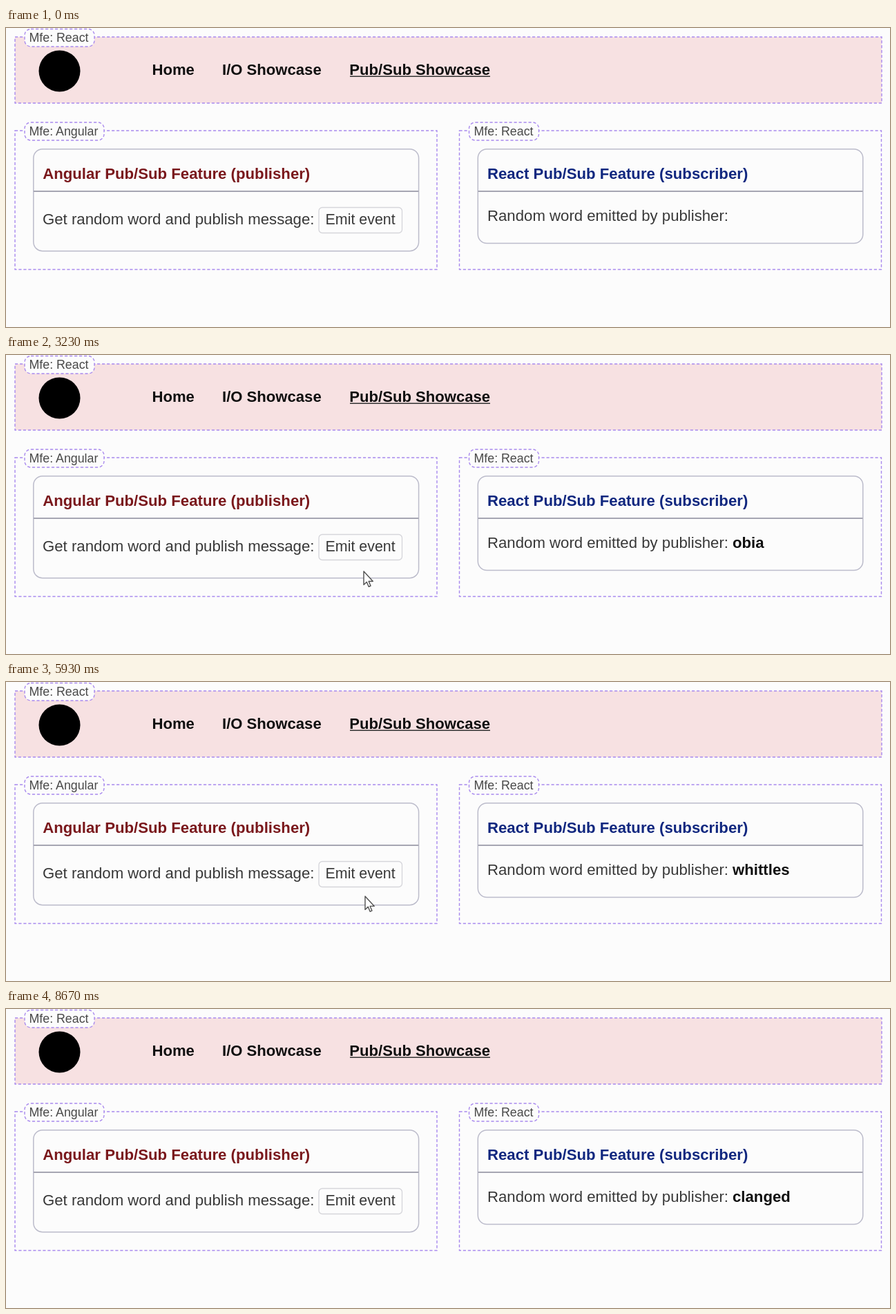
An HTML page for the animation above (8860 ms loop, 1280 by 434 pixels).

```html
<!DOCTYPE html>
<html lang="en">
<head>
<meta charset="utf-8">
<title>Pub/Sub Showcase</title>
<style>
  html, body { margin: 0; width: 100%; height: 100%; overflow: hidden; background: #fcfcfc; }
  svg { display: block; width: 1280px; height: 434px; }
  text { font: 22.2px "Liberation Sans", Arial, sans-serif; fill: #383838; white-space: pre; }
  .label { font-size: 17.8px; fill: #484848; }
  .nav { font-size: 22.1px; }
  .nav, .title, .word { font-weight: bold; fill: #101010; }
  .dash { fill: #fcfcfc; stroke: #a98aee; stroke-width: 1.4; stroke-dasharray: 4.2 2.8; }
  .bar { fill: #f7e1e2; }
  .card { fill: #fcfcfc; stroke: #bcbccb; stroke-width: 1.5; }
  .rule { stroke: #a6a6b2; stroke-width: 2; }
  .button { fill: #fcfcfc; stroke: #d5d5da; stroke-width: 1.3; }
  .button.hover { fill: #e3e3e3; }
  #cursor path { fill: #fff; stroke: #505050; stroke-width: 1.4; stroke-linejoin: round; }
</style>
</head>
<body>
<svg viewBox="0 0 1280 434">
  <rect class="dash bar" x="13" y="13" width="1255" height="96"/>
  <rect class="dash" x="13" y="149" width="611" height="201.5"/>
  <rect class="dash" x="656.5" y="149" width="611" height="201.5"/>

  <rect class="dash" x="27" y="1.5" width="101" height="25.5" rx="9"/>
  <rect class="dash" x="27" y="137" width="115" height="26" rx="9"/>
  <rect class="dash" x="670.5" y="137" width="101" height="26" rx="9"/>
  <text class="label" x="33.5" y="20">Mfe: React</text>
  <text class="label" x="33.5" y="156">Mfe: Angular</text>
  <text class="label" x="677.5" y="156">Mfe: React</text>

  <circle cx="77.5" cy="62.5" r="30"/>
  <text class="nav" x="211.5" y="68">Home</text>
  <text class="nav" x="313" y="68">I/O Showcase</text>
  <text class="nav" x="497.3" y="68">Pub/Sub Showcase</text>
  <path d="M498 70.3H701" stroke="#333" stroke-width="1.5"/>

  <rect class="card" x="39.8" y="175.7" width="557.8" height="148" rx="13"/>
  <path class="rule" d="M40 237H597.5"/>
  <text class="title" x="53.2" y="219" style="fill:#7a181c">Angular Pub/Sub Feature (publisher)</text>
  <text x="53" y="285">Get random word and publish message:</text>
  <rect class="button" id="button" x="453" y="260.5" width="120.5" height="37" rx="5"/>
  <text x="462.6" y="285" style="font-size:21.4px">Emit event</text>

  <rect class="card" x="683.3" y="175.7" width="557.5" height="136.8" rx="13"/>
  <path class="rule" d="M683.5 237H1240.5"/>
  <text class="title" x="697" y="219" style="fill:#10277f">React Pub/Sub Feature (subscriber)</text>
  <text x="697" y="280">Random word emitted by publisher:</text>
  <text class="word" id="word" x="1052" y="280"></text>

  <g id="cursor">
    <path id="arrow" d="M0 0V19.5L4.3 15.4 7.2 22.3 10 21 7.2 14.5H13.3Z"/>
    <g id="hand" transform="translate(-1 0) scale(.95)">
      <path d="M-2 17V2.2Q-2 0 .2 0T2.4 2.2V10Q2.6 8.4 4.6 8.4T6.8 10.4Q7.2 9.4 9 9.4 11 9.6 11 11.6 11.6 10.8 13 11 15 11.4 15 13.6V20Q15 23 13 26V30H.5V27Q-2 24 -4 21L-7 17Q-7.5 14.5 -5.5 14.5 -4 14.5 -2 17Z"/>
      <path d="M2.4 9V15M6.8 10V15.5M11 11.5V16"/>
    </g>
  </g>
</svg>
<script>
  const LOOP = 8860;
  const ENTER = 1430, EXIT = 7800;
  const easeOut = p => 1 - (1 - p) ** 2;
  const easeIn = p => p * p;

  // start, end, target x, target y, easing
  const moves = [
    [1430, 2300, 514, 287, easeOut],
    [2630, 3230, 518, 314, easeOut],
    [3970, 4400, 514, 286.5, easeOut],
    [4870, 5530, 520, 311, easeOut],
    [5930, 6400, 514, 289, easeOut],
    [6800, 7270, 520, 305, easeOut],
    [7530, 7800, 560, 440, easeIn]
  ];
  const words = [[0, ''], [2630, 'obia'], [4760, 'whittles'], [6800, 'clanged']];

  const el = id => document.getElementById(id);
  const button = el('button'), word = el('word'), cursor = el('cursor');
  const arrow = el('arrow'), hand = el('hand');
  const show = (node, on) => { node.style.display = on ? '' : 'none'; };

  function cursorAt(t) {
    let x = 532, y = 445;
    for (const [start, end, toX, toY, ease] of moves) {
      if (t < start) break;
      const k = ease(Math.min(1, (t - start) / (end - start)));
      x += (toX - x) * k;
      y += (toY - y) * k;
    }
    return [x, y];
  }

  function draw(t) {
    const [x, y] = cursorAt(t);
    const visible = t >= ENTER && t < EXIT;
    const hover = visible && y < 298;
    cursor.setAttribute('transform', `translate(${x} ${y})`);
    show(cursor, visible);
    show(hand, hover);
    show(arrow, !hover);
    button.classList.toggle('hover', hover);
    word.textContent = words.findLast(([start]) => t >= start)[1];
  }

  const origin = performance.now();
  function tick() {
    draw((performance.now() - origin) % LOOP);
    requestAnimationFrame(tick);
  }
  tick();
</script>
</body>
</html>
```
